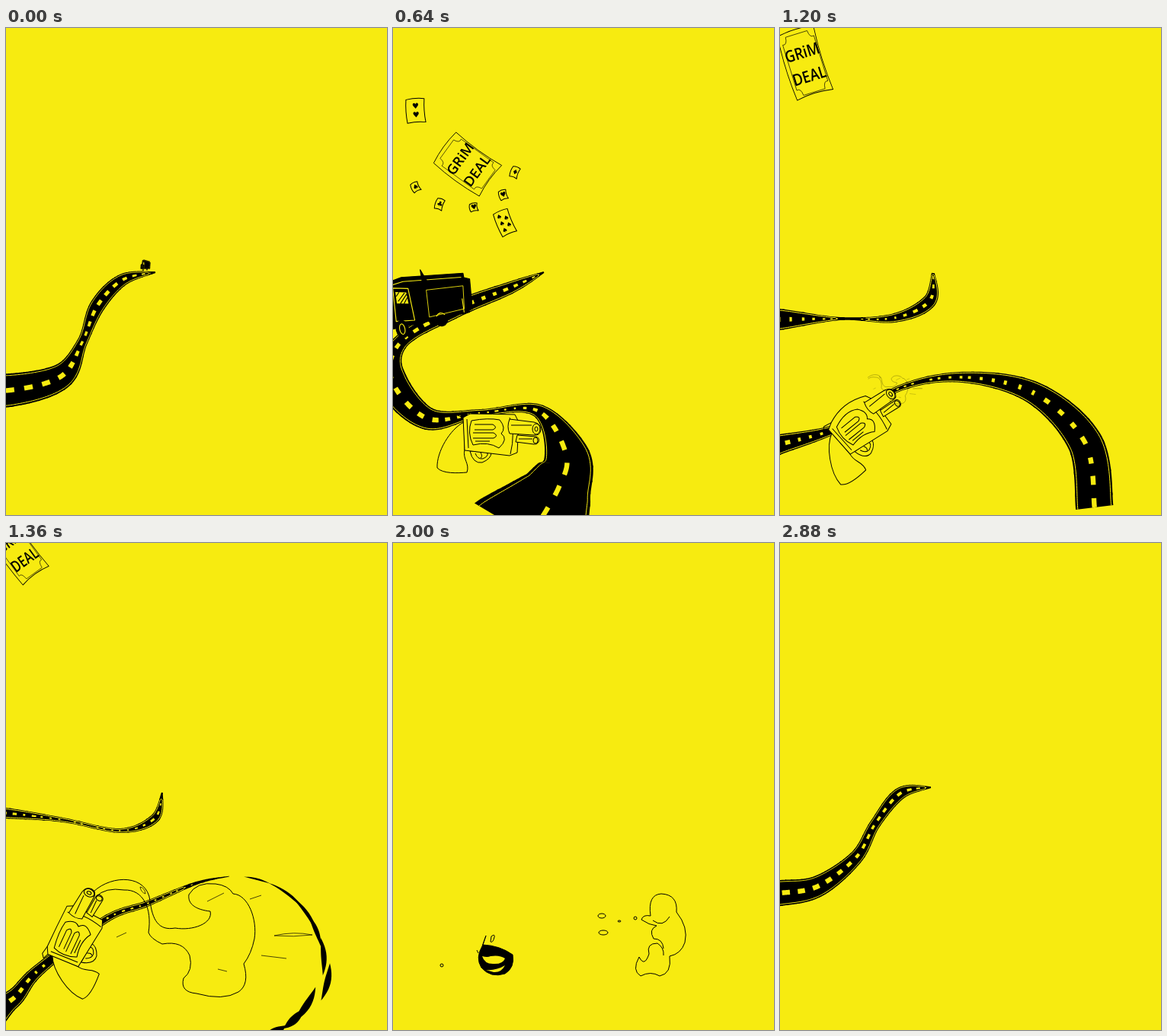
An HTML page with a canvas for the animation above (2960 ms loop, 500 by 640 pixels).

```html
<!DOCTYPE html>
<html lang="en">
<head>
<meta charset="utf-8">
<title>Winding road</title>
<style>
html, body { margin: 0; width: 100%; height: 100%; overflow: hidden; background: #f7eb10; }
canvas { display: block; width: 500px; height: 640px; }
</style>
</head>
<body>
<canvas id="stage" width="500" height="640"></canvas>
<script>
const ctx = document.getElementById('stage').getContext('2d');
const YELLOW = '#f7eb10', INK = '#000', LOOP = 2960, STEP = 80, SAMPLES = 320;
const lerp = (a, b, k) => a + (b - a) * k;
const rad = deg => deg * Math.PI / 180;

function seeded(seed) {
  return () => (seed = seed * 16807 % 2147483647) / 2147483647;
}
// Finds the two keys around t: [key, next key, fraction].
function around(keys, t) {
  let i = 0;
  while (i < keys.length - 2 && t >= keys[i + 1][0]) i++;
  const k = (t - keys[i][0]) / (keys[i + 1][0] - keys[i][0]);
  return [keys[i], keys[i + 1], Math.min(1, Math.max(0, k))];
}
function track(keys, t) {
  const [a, b, k] = around(keys, t);
  return a.slice(1).map((v, i) => lerp(v, b[i + 1], k));
}
function shape(d, fill, stroke = INK, width = 1) {
  const p = new Path2D(d);
  if (fill) { ctx.fillStyle = fill; ctx.fill(p); }
  if (stroke) { ctx.strokeStyle = stroke; ctx.lineWidth = width; ctx.stroke(p); }
}
function at(x, y, angle, sx, sy, draw) {
  ctx.save();
  ctx.translate(x, y);
  ctx.rotate(rad(angle));
  ctx.scale(sx, sy);
  draw();
  ctx.restore();
}
function ring(x, y, rx, ry, fill, stroke) {
  shape(`M${x - rx} ${y}a${rx} ${ry} 0 1 0 ${2 * rx} 0a${rx} ${ry} 0 1 0 ${-2 * rx} 0`, fill, stroke);
}

// Road poses: [x, y, half width] from the far tip to the near end.
const hill = [[196, 321, 1], [153, 331, 8], [120, 365, 10], [100, 413, 7], [72, 458, 17], [5, 476, 22], [-50, 472, 23]];
const bend = [[199, 321, 1], [130, 329, 6], [72, 369, 16], [70, 430, 19], [120, 482, 11], [163, 520, 7],
  [130, 558, 21], [50, 562, 28], [-25, 542, 36]];
const wave = [[198, 321, 1], [155, 341, 8], [80, 371, 11], [10, 413, 10], [-2, 462, 20], [45, 513, 15],
  [115, 506, 5], [190, 503, 9], [227, 560, 30], [217, 605, 46], [180, 668, 85]];
const split = [[201, 322, 2], [196, 359, 9], [150, 381, 6], [80, 382, 2], [0, 383, 14], [-60, 385, 20],
  [-60, 560, 20], [0, 547, 13], [85, 522, 5], [150, 499, 5], [205, 484, 9], [265, 505, 19], [308, 570, 29], [316, 655, 31]];
const torn = [[205, 328, 1], [195, 362, 6], [150, 378, 3], [75, 364, 3], [0, 355, 7], [-60, 352, 8],
  [-60, 632, 22], [5, 602, 13], [42, 562, 8], [130, 495, 5], [185, 474, 4], [250, 447, 2], [293, 438, .3]];
const rise = [[198, 321, 1], [158, 329, 8], [125, 369, 7], [100, 413, 9], [50, 451, 14], [0, 460, 17], [-50, 462, 17]];
const sweep = split.map(([x, y, w]) => y > 400 && x > 140 ? [140 + (x - 140) * 1.55, y - 25, w * .8] : [x, y, w]);
const thin = torn.map(([x, y, w]) => [x, y, w * .3]);
const curl = rise.map((_, i) => [135 + 17 * Math.cos(i - 2.3), 547 + 17 * Math.sin(i - 2.3), i ? 6 : 1]);

function sampleSpline(points) {
  const n = points.length, P = i => points[Math.min(n - 1, Math.max(0, i))];
  return Array.from({ length: SAMPLES }, (_, s) => {
    const u = s / (SAMPLES - 1) * (n - 1), i = Math.min(n - 2, Math.floor(u)), f = u - i;
    return [0, 1, 2].map(c => {
      const a = P(i - 1)[c], b = P(i)[c], d = P(i + 1)[c], e = P(i + 2)[c];
      return b + f / 2 * (d - a + f * (2 * a - 5 * b + 4 * d - e + f * (3 * (b - d) + e - a)));
    });
  });
}
const roadKeys = [[0, hill], [320, bend], [640, wave], [960, split], [1200, sweep], [1280, torn], [1360, torn],
  [1680, thin], [2320, curl], [2800, rise], [2880, rise], [2960, hill]].map(([t, p]) => [t, sampleSpline(p)]);

function roadAt(t) {
  const [a, b, k] = around(roadKeys, t);
  const pts = a[1].map((p, i) => p.map((v, c) => lerp(v, b[1][i][c], k)));
  return pts.map(([x, y, w], i) => {
    const p = pts[Math.max(0, i - 1)], q = pts[Math.min(SAMPLES - 1, i + 1)];
    const dx = q[0] - p[0], dy = q[1] - p[1], len = Math.hypot(dx, dy) || 1;
    return { x, y, w: Math.max(.3, w), nx: -dy / len, ny: dx / len, step: len / 2 };
  });
}
function strip(pts, width = p => p.w) {
  const edge = side => p => ctx.lineTo(p.x + p.nx * width(p) * side, p.y + p.ny * width(p) * side);
  ctx.beginPath();
  pts.forEach(edge(1));
  [...pts].reverse().forEach(edge(-1));
  ctx.fill();
}
function drawRoad(road, from = 0) {
  const part = road.slice(from);
  ctx.fillStyle = INK;
  for (let i = 0; i < part.length - 1; i += 8) strip(part.slice(i, i + 10));
  ctx.strokeStyle = YELLOW;
  ctx.lineWidth = 1;
  for (const side of [-1, 1]) {
    ctx.beginPath();
    for (const p of part) {
      const inset = side * (p.w * .93 - 1);
      if (p.w > 2.5) ctx.lineTo(p.x + p.nx * inset, p.y + p.ny * inset);
      else ctx.moveTo(p.x, p.y);
    }
    ctx.stroke();
  }
  ctx.fillStyle = YELLOW;
  const dashWidth = p => Math.min(3.2, p.w * .24);
  let phase = .6, dash = [];
  const flush = () => { if (dash.length > 1) strip(dash, dashWidth); dash = []; };
  road.forEach((p, i) => {
    phase += p.step / (8 + .8 * Math.min(30, p.w));
    if (phase % 1 < .52 && i >= from && p.w > 2) dash.push(p);
    else flush();
  });
  flush();
}

// Dry brush strokes left along the last bend of the road.
function drawBrush(t) {
  const [grow, thick] = track([[1280, .96, 1.3], [1360, 1, 1], [1680, 1.15, .2]], t);
  const random = seeded(29);
  ctx.fillStyle = INK;
  for (let i = 0; i < 9; i++) {
    const from = -84 + i * 17, span = 18 + 16 * random(), width = (1.2 + i * .6) * thick;
    const reach = grow * (i > 3 ? .95 + .2 * random() : 1);
    strip(Array.from({ length: 13 }, (_, j) => {
      const a = rad(from + span * j / 12), nx = Math.cos(a), ny = Math.sin(a);
      return { x: 300 + 115 * reach * nx, y: 550 + 112 * reach * ny, nx, ny, w: width * Math.sin(Math.PI * j / 12) };
    }));
  }
}

function drawVan(t) {
  const [x, y, sx, sy, angle] = track([[0, 183, 312, .11, .22, 0], [160, 190, 300, .5, .5, 0],
    [320, 117, 295, 1, 1, 0], [640, 38, 362, 1.15, 1.15, -12], [800, -85, 405, 1.2, 1.2, -16]], t);
  at(x, y, angle, sx, sy, () => {
    shape('M53-19L59-16L55 18L47 20Z', INK);
    shape('M-37-31L-17-34L53-24L51 21L-57 22L-59 14L-56-5L-42-10Z', INK);
    shape('M-36-27L-16-29L50-20M46 4L45 20M-57-2L-50 1L-55 6L-50 9L-56 14', null, YELLOW);
    shape('M-29-24L-12-20V17L-33 14Z', INK, YELLOW);
    shape('M-27-19L-15-16V-3L-28-6Z', YELLOW, null);
    shape('M-26-8L-17-16M-24-5L-15-14M-20-4L-15-10M-27-14L-23-18', null);
    ring(-28, 24, 7, 10, INK);
    ring(-28, 24, 3, 6, null, YELLOW);
    ring(18, 22, 7, 8, INK);
    shape('M13 18Q18 12 23 18', null, YELLOW);
    if (t >= 480) {
      shape('M6-38L5-14L14-15Z', INK);
      shape('M8-14L50-10L46 16L5 17Z', null, YELLOW, .7);
    }
  });
}

function drawGun(t) {
  const [x, y, angle, scale] = track([[160, 100, 580, -30, .6], [320, 111, 518, -25, .9], [640, 125, 532, 0, 1],
    [960, 122, 530, 0, 1], [1360, 87, 519, -65, 1], [1680, 92, 530, -45, .95], [1920, 125, 547, -20, .15]], t);
  const bulge = Math.max(0, 1 - Math.abs(t - 1000) / 340);
  ctx.save();
  if (t < 480) { ctx.beginPath(); ctx.rect(0, 0, 500, 545); ctx.clip(); }
  at(x, y, angle, scale * (1 - .08 * bulge), scale, () => {
    shape('M-32-14C-50-5-68 25-67 46C-60 54-40 53-28 52C-24 40-34 35-31 22Z', YELLOW);
    shape('M-24 24Q-20 41-8 39Q4 34 4 26ZM-17 27Q-14 35-7 34Q0 31-1 27M-10 26Q-7 31-10 33', YELLOW);
    shape(`M-33-20L-24-25Q5 ${-25 - 30 * bulge} 35-24L40-14L38 26L28 30L-31 23Z`, YELLOW);
    shape('M-33-20L-40-23L-35-27L-24-25M-28-18L-26 20M28-20Q36 0 29 28', null);
    shape(`M-22-16Q0 ${-20 - 14 * bulge} 15-17Q24-6 17 1Q27 8 14 20Q0 11-20 16Q-28 0-22-16Z`, YELLOW);
    shape('M-18-11H6Q13-7 6-4H-18M-20 0H7Q14 4 7 7H-20M-17 11H2', null);
    shape('M28-18L60-14Q69-12 69-4Q68 4 60 3L28 1Q24-8 28-18Z', YELLOW);
    shape('M38 3L62 5Q68 6 66 12Q64 16 60 15L36 12Z', YELLOW);
    ring(63, -5, 5, 7);
    ring(63, -5, 2, 3);
    ring(62, 10, 3, 4);
    shape('M30-10H57M40 8H58', null);
  });
  ctx.restore();
}

function cardOutline(w, h, bow) {
  const x = w / 2, y = h / 2;
  return `M${-x} ${-y}Q0 ${-y - bow} ${x} ${-y}Q${x - bow} 0 ${x} ${y}Q0 ${y - bow} ${-x} ${y}Q${-x - bow} 0 ${-x} ${-y}Z`;
}
function drawBigCard(t) {
  const [x, y, w, h, angle] = track([[400, 100, 298, 8, 12, -90], [640, 98, 179, 50, 74, -54],
    [960, 62, 103, 60, 90, 11], [1360, 14, 8, 42, 86, -36], [1520, -20, -50, 40, 80, -50]], t);
  at(x, y, angle, w / 60, h / 90, () => {
    shape(cardOutline(60, 90, 5), YELLOW);
    shape('M-26-32Q-19-30-18-41H18Q19-30 26-32V32Q19 30 18 41H-18Q-19 30-26 32Z', null, INK, .7);
    ctx.fillStyle = INK;
    ctx.textAlign = 'center';
    ctx.font = '600 22px "Open Sans", sans-serif';
    ctx.fillText('GRiM', 0, -7);
    ctx.fillText('DEAL', 0, 26);
  });
}

// Two large cards, and an arc of little ones below the big card.
const smallCards = [
  { x: 30, y: 109, w: 24, h: 31, suit: '♥', count: 2 },
  { x: 147, y: 256, w: 20, h: 32, suit: '♠', count: 5 },
  ...Array.from('♦♥♥♣♠', (suit, i) => ({
    x: 92 + 68 * Math.cos(i * .68), y: 190 + 47 * Math.sin(i * .68), w: 10, h: 14 - i % 3 * 2, suit, count: 1, stays: i > 1
  }))
];
function drawSmallCards(t) {
  const [k, flip, drop] = track([[400, 0, .5, 0], [640, 1, 1, 0], [960, 1, .12, 1], [1040, 1, .1, 1.3]], t);
  smallCards.forEach(({ x, y, w, h, suit, count, stays }, i) => {
    if (t > 800 && !stays) return;
    at(lerp(100, x, k), lerp(300, y, k) + drop * (x < 60 ? 20 : -14), 25 * Math.sin(i * 4) - 4, k, k * flip, () => {
      shape(cardOutline(w, h, 2), YELLOW);
      ctx.fillStyle = INK;
      ctx.textAlign = 'center';
      ctx.textBaseline = 'middle';
      ctx.font = w * (count > 1 ? .42 : .9) + 'px "DejaVu Sans", sans-serif';
      for (let n = 0; n < count; n++)
        ctx.fillText(suit, count > 2 ? (n % 2 ? 4 : -4) : 0, ((n + .5) / count - .5) * h * .75);
    });
  });
}

function drawPuff(t) {
  const [k, dx] = track([[1200, .25, 0], [1280, .7, 0], [1360, 1, 0], [1680, 1, 45]], t);
  at(115 + dx, 460, 0, k, k, () => {
    ctx.translate(-115, -460);
    shape('M115 458C140 435 185 436 189 470C192 495 200 510 222 506C245 510 272 500 268 484C250 482 238 475 240 462' +
      'Q250 445 275 448Q292 450 298 461C318 462 330 495 326 520Q322 540 312 553Q320 580 305 590Q285 602 250 592' +
      'Q228 590 233 572Q246 562 241 542Q232 522 205 527Q190 520 187 512C192 480 180 455 155 456Q130 452 118 465');
    shape('M176 452Q182 453 183 461Q177 459 176 452M352 516Q378 510 402 515Q378 518 352 516M335 542L368 546' +
      'M145 518L158 512M320 468L335 463M264 471L286 460M278 560L290 563', null, INK, .7);
  });
}
function drawWisp(t) {
  const [dx, k] = track([[1760, -45, 1.15], [2000, 0, 1], [2320, 20, .75], [2640, 30, .1]], t);
  at(350 + dx, 515, 0, k, k, () => {
    ctx.translate(-350, -515);
    shape('M338 490Q334 462 352 461Q374 462 372 485Q388 505 383 525Q378 540 363 543Q366 566 350 569Q338 562 325 569' +
      'Q313 562 323 544Q330 558 336 540Q332 526 347 526Q356 532 355 542M355 533Q354 520 342 520Q335 508 346 503' +
      'Q336 502 326 495Q328 488 338 490M341 496Q354 506 363 491');
    if (t < 2320) {
      ring(274, 490, 5, 3);
      ring(276, 512, 6, 3);
      ring(297, 497, 2, 1);
      ring(318, 493, 2, 2);
    }
  });
}
function drawBlob(t) {
  const [x, y, k] = track([[1760, 108, 546, .5], [2000, 135, 546, 1], [2320, 135, 547, .95]], t);
  at(x, y, 0, k, k, () => {
    ctx.translate(-135, -546);
    shape('M122 516L118 528Q140 529 157 541Q160 558 147 566Q128 572 116 558Q108 545 117 530Z', INK);
    shape('M117 543Q124 545 128 543Q140 541 147 546Q144 554 131 553Q120 553 117 543M122 561Q136 562 147 555Q142 565 132 564Z', YELLOW, null);
    shape('M129 517Q134 513 133 518Q131 526 128 524ZM110 535L112 539');
    ring(64, 555, 2, 2);
  });
}

function draw(t) {
  ctx.fillStyle = YELLOW;
  ctx.fillRect(0, 0, 500, 640);
  ctx.lineJoin = 'round';
  if (t >= 400 && t <= 1040) drawSmallCards(t);
  if (t >= 400 && t < 1520) drawBigCard(t);
  const road = roadAt(t);
  if (t < 1760 || t > 2320) drawRoad(road);
  if (t >= 1280 && t <= 1680) drawBrush(t);
  if (t < 800) drawVan(t);
  if (t >= 240 && t < 1920) drawGun(t);
  if (t >= 240 && t < 480) drawRoad(road, Math.round(SAMPLES * .67));
  if (t >= 1200 && t <= 1680) drawPuff(t);
  if (t >= 1760 && t < 2640) drawWisp(t);
  if (t >= 1760 && t <= 2320) drawBlob(t);
}

let start;
function tick(now) {
  start ??= now;
  draw(Math.floor(Math.max(0, now - start) % LOOP / STEP) * STEP);
  requestAnimationFrame(tick);
}
draw(0);
requestAnimationFrame(tick);
</script>
</body>
</html>
```
